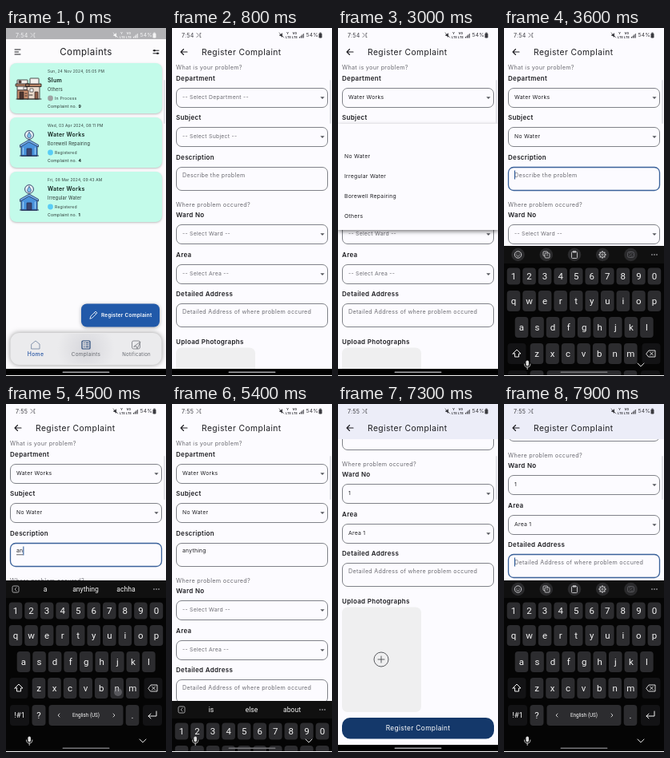
Write an HTML page with a canvas that moves like this. It is 200x436 px and loops after 8 s.

```html
<!DOCTYPE html>
<html lang="en">
<head>
<meta charset="utf-8">
<title>Register Complaint</title>
<style>
  html, body { margin: 0; width: 100%; height: 100%; overflow: hidden; background: #000; }
  canvas { display: block; width: 200px; height: 436px; }
</style>
</head>
<body>
<canvas id="stage"></canvas>
<script>
const W = 200, H = 436, LOOP = 8000, STEP = 100;
const canvas = document.getElementById('stage');
const ctx = canvas.getContext('2d');
const dpr = window.devicePixelRatio || 1;
canvas.width = W * dpr;
canvas.height = H * dpr;

const PAPER = '#fcfbff', INK = '#1d1d21', HINT = '#6c6c72', BLUE = '#1f4f91', BORDER = '#808289';
const UI = 'Inter, sans-serif', KEYS = 'Roboto, sans-serif';

const clamp = v => Math.max(0, Math.min(1, v));
const progress = (t, from, to) => clamp((t - from) / (to - from));
const easeOut = (p, power = 3) => 1 - Math.pow(1 - p, power);
const between = (t, from, to) => t >= from && t < to;

function rect(x, y, w, h, fill) {
  ctx.fillStyle = fill;
  ctx.fillRect(x, y, w, h);
}

function round(x, y, w, h, r, fill, stroke, line = 0.8) {
  ctx.beginPath();
  ctx.roundRect(x, y, w, h, r);
  paint(fill, stroke, line);
}

function circle(x, y, r, fill, stroke, line = 0.8) {
  ctx.beginPath();
  ctx.arc(x, y, r, 0, Math.PI * 2);
  paint(fill, stroke, line);
}

function path(d, x, y, stroke, line = 1, fill) {
  ctx.save();
  ctx.translate(x, y);
  ctx.lineWidth = line;
  ctx.lineCap = ctx.lineJoin = 'round';
  const shape = new Path2D(d);
  if (fill) { ctx.fillStyle = fill; ctx.fill(shape); }
  if (stroke) { ctx.strokeStyle = stroke; ctx.stroke(shape); }
  ctx.restore();
}

function paint(fill, stroke, line) {
  if (fill) { ctx.fillStyle = fill; ctx.fill(); }
  if (stroke) { ctx.strokeStyle = stroke; ctx.lineWidth = line; ctx.stroke(); }
}

function shadow(blur, y, color, draw) {
  ctx.save();
  ctx.shadowBlur = blur * dpr;
  ctx.shadowOffsetY = y * dpr;
  ctx.shadowColor = color;
  draw();
  ctx.restore();
}

// y is the middle of the capitals; the interface face is set a little smaller and looser
function text(s, x, y, size, color = INK, { weight = 400, align = 'left', font = UI } = {}) {
  const em = font === UI ? size * 0.93 : size;
  ctx.font = `${weight} ${em}px ${font}`;
  ctx.letterSpacing = font === UI ? `${em * 0.04}px` : '0px';
  ctx.textAlign = align;
  ctx.fillStyle = color;
  ctx.fillText(s, x, y + em * 0.36);
}

function statusBar(t, color) {
  text(t < 4000 ? '7:54' : '7:55', 12, 9, 7.6, color);
  path('M-2-2.5L0-.5M-2 2.5L0 .5M3-2.5H2V2.5H3', 33, 9, color, 0.7);
  path('M-2.5-1H-1L1-3V3L-1 1H-2.5Z', 137, 9, null, 0, color);
  path('M-3-3L3 3', 137, 9, color, 0.7);
  text('Y', 143, 7, 4.4, color, { weight: 700 });
  text('LTE', 142, 11.2, 4, color, { weight: 700 });
  text('Vo', 150.5, 7, 4.4, color, { weight: 700 });
  text('LTE', 150, 11.2, 4, color, { weight: 700 });
  for (let i = 0; i < 4; i++) rect(159 + i * 1.6, 11 - i * 1.3, 1, 1.5 + i * 1.3, color);
  text('54%', 167.5, 9, 7.2, color);
  round(183.5, 6.5, 4, 6, 1.2, color);
  rect(184.5, 5.6, 2, 1, color);
}

function edgeHandle() {
  round(197, 65, 2, 55, 1, '#e2e2e8');
}

function navHandle(color) {
  round(70.5, 430.4, 59, 1.6, 0.8, color);
}

function slumIcon() {
  const line = '#2a2322';
  round(14, 65, 13, 13, 0.5, '#efebe8', line);
  round(26, 71, 16, 18, 0.5, '#ead9cb', line);
  round(14, 78, 14, 11, 0.5, '#c98f6f', line);
  path('M12.5 70H29V73H12.5ZM25 70H44V73.5H25Z', 0, 0, line, 0.9, '#b98365');
  round(30, 63, 11, 7, 0.5, '#f3f0ed', line);
  round(16, 66, 3, 3, 0.2, '#5b4038', line, 0.6);
  round(22, 74, 4, 3, 0.2, '#fff', line, 0.6);
  round(17, 80, 5, 9, 0.2, '#4c342e', line, 0.7);
  round(30, 76, 4, 4, 0.2, '#fff', line, 0.7);
  round(36, 80, 4, 9, 0.2, '#8d5a46', line, 0.7);
  path('M13 89H44M24 82H26M24 85H26M29 84H33', 0, 0, line, 0.9);
}

function houseIcon(y) {
  const line = '#253058';
  path('M19 48V35L29 29L39 35V48Z', 0, y, line, 1, '#4a93dc');
  path('M17.5 37V34.5L29 28L40.5 34.5V37L29 31Z', 0, y, line, 0.8, '#76b1ec');
  round(26, y + 39, 6, 9, 0.5, '#3c446d', line, 0.8);
  path('M21.5 38V46M36.5 38V46', 0, y, '#9ccaf3', 1.2);
  path('M17.5 48H40.5', 0, y, line, 1.1);
  circle(29, y + 22, 5.4, '#e9f4fb', line, 0.9);
  path('M0-3.4C1.6-1 2.4 .3 2.4 1.4A2.4 2.4 0 0 1-2.4 1.4C-2.4 .3-1.6-1 0-3.4Z', 29, y + 22, line, 0.6, '#7cc0ee');
}

function card(y, c) {
  shadow(2.5, 1, 'rgba(0,0,0,.25)', () => round(5, y, 190, 63, 8, '#c3fbea'));
  text(c.date, 52, y + 10, 5.2, '#33413e');
  text(c.kind, 52, y + 21, 7.5, '#10201c', { weight: 600 });
  text(c.detail, 52, y + 33, 6, '#26332f');
  circle(55.5, y + 44, 3.4, c.dot);
  text(c.state, 61, y + 44, 5.5, '#33413e');
  text('Complaint no. ', 52, y + 54, 5.6, '#26332f');
  text(c.no, 90.5, y + 54, 5.6, '#10201c', { weight: 700 });
  c.kind === 'Slum' ? slumIcon() : houseIcon(y);
}

const complaints = [
  { date: 'Sun, 24 Nov 2024, 05:05 PM', kind: 'Slum', detail: 'Others', state: 'In Process', dot: '#9fa3a3', no: '9' },
  { date: 'Wed, 03 Apr 2024, 08:11 PM', kind: 'Water Works', detail: 'Borewell Repairing', state: 'Registered', dot: '#59cdf5', no: '4' },
  { date: 'Fri, 08 Mar 2024, 09:43 AM', kind: 'Water Works', detail: 'Irregular Water', state: 'Registered', dot: '#59cdf5', no: '1' }
];

function home(t) {
  rect(0, 0, W, 427, '#fcfbfd');
  rect(0, 0, W, 14, '#b2b2b5');
  statusBar(t, '#f3f3f4');
  path('M0-3H7M0 0H4.5M0 3H7', 11, 30, INK, 1);
  path('M0-1.8H7M7 1.8H0', 184, 30, INK, 1);
  circle(185.5, 28.2, 1.3, INK);
  circle(189.5, 31.8, 1.3, INK);
  text('Complaints', 100, 30, 12.4, INK, { align: 'center' });
  complaints.forEach((c, i) => card(44 + i * 68, c));
  edgeHandle();

  shadow(4, 1, 'rgba(0,0,0,.3)', () => round(94, 345.5, 98, 29, 7, t < 200 ? '#2159a9' : '#3267b2'));
  path('M-4 4L-3 1L3-5L5-3L-1 3ZM1.5-3.5L3.5-1.5', 109, 360, '#fff', 0.8);
  text('Register Complaint', 119, 359.8, 6.9, '#fff', { weight: 600 });

  shadow(6, 0, 'rgba(0,0,0,.4)', () => round(5.5, 382, 189, 40, 11, '#ebebed'));
  const glow = ctx.createRadialGradient(100, 402, 4, 100, 402, 36);
  glow.addColorStop(0, 'rgba(190,190,198,.4)');
  glow.addColorStop(1, 'rgba(190,190,198,0)');
  rect(64, 383, 72, 38, glow);
  path('M-5-1L0-5L5-1V5H-5Z', 37, 397, '#6d809f', 0.8);
  round(95, 392, 10, 10, 1, null, '#244777', 1.2);
  path('M-2.5-2.5H-2M0-2.5H3M-2.5 0H-2M0 0H3M-2.5 2.5H-2M0 2.5H3', 100, 397, '#244777', 1);
  round(157.5, 392, 10, 10, 2, null, '#74777d', 0.8);
  path('M-3 1L5-5L1 4L0 1Z', 163, 398, '#74777d', 0.8, '#ebebed');
  text('Home', 37, 408.5, 7.4, '#2a58a5', { align: 'center', weight: 500 });
  text('Complaints', 100, 409, 6.9, '#66696f', { align: 'center' });
  text('Notification', 163, 409, 6.5, '#66696f', { align: 'center' });
}

function label(s, y) {
  text(s, 5, y, 8.6, INK, { weight: 600 });
}

function fieldBox(top, height, focused) {
  round(5.5, top + 0.5, 189, height, 6.5, null, focused ? '#3a619a' : BORDER, focused ? 1.3 : 1);
}

function select(title, top, value, hint) {
  label(title, top - 12);
  fieldBox(top, 24);
  text(value || hint, 13, top + 12, 7.35, value ? INK : HINT);
  path('M-2.6-1.2H2.6L0 1.5Z', 188, top + 12.5, null, 0, '#55575d');
}

function area(title, top, value, hint, focused, composing) {
  label(title, top - 12);
  fieldBox(top, 29, focused);
  text(value || hint, 13, top + 10, value ? 7.3 : 7.7, value ? INK : HINT);
  if (!focused) return;
  const width = value ? ctx.measureText(value).width : 0;
  if (composing) rect(13, top + 14.5, width, 0.7, INK);
  rect(13 + width, top + 4.5, 1, 11, BLUE);
}

const menus = [
  { top: 75, open: 1200, close: 1600, items: ['', 'Water Works', 'Drainage', 'Street Light', 'Health', 'Slum'] },
  { top: 124, open: 2300, close: 3000, items: ['', 'No Water', 'Irregular Water', 'Borewell Repairing', 'Others'] },
  { top: 246, open: 5800, close: 6300, items: ['', '1', '2'] },
  { top: 296, open: 6500, close: 6800, items: ['', 'Area 1', 'Area 2'] }
];

function menu(m, t) {
  if (!between(t, m.open, m.close + 300)) return;
  const grow = easeOut(progress(t, m.open - 50, m.open + 300));
  const height = 33 + (m.items.length - 1) * 25 * grow;
  ctx.save();
  ctx.globalAlpha = 1 - progress(t, m.close, m.close + 300);
  shadow(5, 2, 'rgba(0,0,0,.5)', () => rect(0, m.top - 4, W, height, PAPER));
  m.items.forEach((item, i) => {
    if (16 + i * 25 + 6 < height) text(item, 8, m.top + 12 + i * 25, 7.35);
  });
  ctx.restore();
}

function scrollAt(t) {
  return Math.round(90 * easeOut(progress(t, 5500, 5800))
    + 56 * easeOut(progress(t, 7000, 7300))
    + 11 * easeOut(progress(t, 7600, 7900)));
}

function typedAt(t) {
  if (t < 4100) return '';
  if (t < 4500) return 'a';
  return t < 4800 ? 'an' : 'anything';
}

function form(t) {
  const scroll = scrollAt(t);
  rect(0, 0, W, 427, PAPER);
  ctx.save();
  ctx.beginPath();
  ctx.rect(0, 44, W, 383);
  ctx.clip();
  ctx.translate(0, -scroll);
  text('What is your problem?', 5, 49, 7.8, HINT);
  select('Department', 75, t >= 1600 && 'Water Works', '-- Select Department --');
  select('Subject', 124, t >= 3000 && 'No Water', '-- Select Subject --');
  area('Description', 174, typedAt(t), 'Describe the problem', between(t, 3400, 5400), between(t, 4100, 4800));
  text('Where problem occured?', 5, 221, 7.8, HINT);
  select('Ward No', 246, t >= 6300 && '1', '-- Select Ward --');
  select('Area', 296, t >= 6800 && 'Area 1', '-- Select Area --');
  area('Detailed Address', 345, '', 'Detailed Address of where problem occured', t >= 7600);
  label('Upload Photographs', 393);
  round(5, 400.5, 99, 131.5, 7, '#efeff0');
  circle(54, 466, 9, null, '#4a4c51', 0.9);
  path('M-4 0H4M0-4V4', 54, 466, '#4a4c51', 0.9);
  round(5, 539, 190, 26.5, 10, '#14386a');
  text('Register Complaint', 100, 552, 9, '#fff', { align: 'center' });
  menus.forEach(m => menu(m, t));
  ctx.restore();

  rect(0, 0, W, 44, scroll > 0 ? '#ecedf8' : PAPER);
  statusBar(t, '#3b3b40');
  path('M8 0H0M3.5-3.5L0 0L3.5 3.5', 11, 30, INK, 1.1);
  text('Register Complaint', 37, 30.3, 11.1);
  edgeHandle();
}

function key(x, y, w, s, size = 11.5, fill = '#2c2c2f') {
  const half = s >= '0' && s <= '9' ? 10.5 : 13;
  round(x - w / 2, y - half, w, half * 2, 4, fill);
  text(s, x, y, size, '#f2f2f2', { align: 'center', font: KEYS });
}

function toolbar(typed) {
  const grey = '#c9c9cc', disc = '#2a2a2c';
  for (let i = -1; i < 2; i++) circle(188 + i * 3, 232, 0.8, grey);
  if (typed) {
    const words = typed === 'anything' ? ['is', 'else', 'about'] : ['a', 'anything', 'achha'];
    round(8, 228, 8, 8, 1.5, null, grey);
    path('M1-2L-1 0L1 2', 12, 232, grey, 0.8);
    words.forEach((w, i) => text(w, 49 + i * 50.5, 232, 8.6, '#f2f2f2', { align: 'center', font: KEYS }));
    return;
  }
  for (let i = 0; i < 5; i++) circle(17.5 + i * 35.25, 232, 8.3, disc);
  circle(17.5, 232, 4.2, null, grey, 1);
  circle(16, 231, 0.6, grey);
  circle(19, 231, 0.6, grey);
  path('M-2 1Q0 3.5 2 1', 17.5, 232, grey, 0.8);
  round(49, 228, 5.5, 5.5, 1, null, grey, 0.9);
  round(51, 230, 6, 6, 1, disc, grey, 0.9);
  text('A', 54, 233, 4, grey, { align: 'center' });
  round(84.5, 228.5, 7, 8, 1, null, grey, 0.9);
  rect(86, 227.3, 4, 2.2, grey);
  for (let i = 0; i < 8; i++) {
    const a = i * Math.PI / 4;
    circle(123 + Math.cos(a) * 3.8, 232 + Math.sin(a) * 3.8, 0.9, grey);
  }
  circle(123, 232, 3.3, disc, grey, 1);
  circle(123, 232, 1.1, null, grey);
  round(154.5, 228.5, 8, 7, 2, null, '#5c5c61', 0.9);
  path('M-2 2L2-2M-2-2H-1M1 2H2', 158.5, 232, '#5c5c61', 0.8);
}

function keyboard(t) {
  const rise = t < 7000
    ? easeOut(progress(t, 3500, 3800), 3.5) * (1 - easeOut(progress(t, 5300, 5600)))
    : easeOut(progress(t, 7600, 7900), 3.5);
  if (rise <= 0) return false;
  const pitch = 19.55, dark = '#131315';
  ctx.save();
  ctx.translate(0, Math.round((1 - rise) * 215));
  rect(0, 221, W, 215, '#050505');
  rect(0, 221, W, 22, '#101010');
  toolbar(t < 7000 ? typedAt(t) : '');
  [['1234567890', 12, 259], ['qwertyuiop', 12, 290], ['asdfghjkl', 22, 323], ['zxcvbnm', 41, 356]]
    .forEach(([row, x, y]) => [...row].forEach((s, i) => key(x + i * pitch, y, 16.6, s)));
  key(16, 356, 23, '', 0, dark);
  path('M-5 0L0-5L5 0H2.5V4H-2.5V0Z', 16, 356, '#eee', 1);
  key(184, 356, 23, '', 0, dark);
  path('M-6 0L-3-4H5V4H-3ZM-1.5-2L2.5 2M2.5-2L-1.5 2', 184, 356, '#eee', 0.9);
  key(17, 390, 24, '!#1', 9.5, dark);
  key(41, 390, 17, '?');
  key(100, 390, 93, 'English (US)', 6.3);
  path('M1-2L-1 0L1 2', 66, 390, '#ddd', 0.9);
  path('M-1-2L1 0L-1 2', 135, 390, '#ddd', 0.9);
  key(158, 390, 16.6, '.');
  key(183, 390, 24, '', 0, dark);
  path('M5-4V2H-5M-2-1L-5 2L-2 5', 183, 389, '#eee', 1);
  ctx.restore();

  round(27.4, 416.5, 3.6, 7, 1.8, '#ddd');
  path('M-3.7-1Q-3.7 3 0 3Q3.7 3 3.7-1M0 3V5.5', 29.2, 422, '#ddd', 0.9);
  path('M-4-2L0 2L4-2', 171, 422, '#ddd', 1);
  return true;
}

// [from, to, x, y] of each touch
const touches = [
  [100, 300, 150, 360], [1100, 1300, 110, 88], [1500, 1700, 60, 112],
  [2200, 2400, 110, 137], [2900, 3000, 60, 161], [3300, 3500, 90, 188],
  [4100, 4300, 23, 328], [4500, 4700, 140, 361], [4800, 5000, 101, 235],
  [5300, 5400, 171, 422], [5700, 5900, 110, 168], [6300, 6400, 60, 193],
  [6400, 6600, 110, 218], [6800, 6900, 60, 243], [7600, 7700, 90, 217]
];

function touchMarks(t) {
  touches.forEach(([from, to, x, y]) => {
    if (between(t, from, to)) circle(x, y, 5, 'rgba(125,125,132,.55)');
  });
}

function render(t) {
  ctx.setTransform(dpr, 0, 0, dpr, 0, 0);
  rect(0, 0, W, H, '#000');
  const enter = easeOut(progress(t, 300, 700));
  if (enter < 1) home(t);
  if (enter > 0) {
    ctx.save();
    ctx.beginPath();
    ctx.rect(0, 0, W, 427);
    ctx.clip();
    ctx.globalAlpha = enter;
    ctx.translate(0, (1 - enter) * 40);
    form(t);
    ctx.restore();
  }
  navHandle(keyboard(t) ? '#77777a' : '#a9a9ad');
  touchMarks(t);
  rect(0, 435, W, 1, '#f4f4f4');
}

const start = performance.now();
function tick() {
  const t = (performance.now() - start) % LOOP;
  render(Math.floor(t / STEP) * STEP);
  requestAnimationFrame(tick);
}
tick();
</script>
</body>
</html>
```
